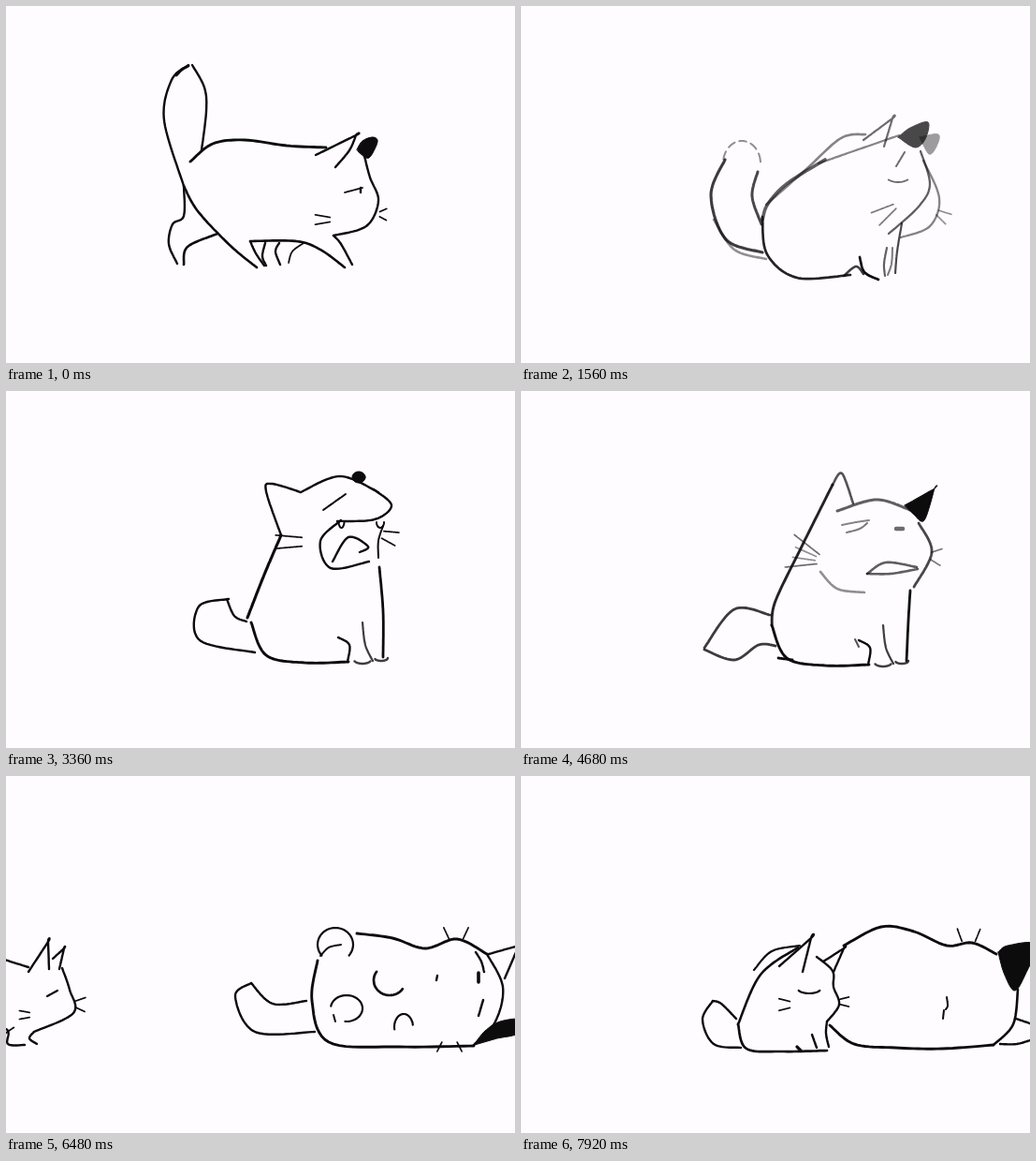
Write an HTML page that moves like this. It is 544 px wide and 381 px high and loops after 8 s.

```html
<!DOCTYPE html>
<html lang="en">
<head>
<meta charset="utf-8">
<title>Two cats</title>
<style>
html, body { margin: 0; width: 100%; height: 100%; overflow: hidden; background: #fefcff; }
svg { display: block; width: 100vw; height: 100vh; fill: none; stroke: #0c0c0c; stroke-linecap: round; stroke-linejoin: round; filter: blur(.45px); }
</style>
</head>
<body>
<svg id="stage" viewBox="0 0 544 381"></svg>
<script>
const LOOP = 8000, STEP = 120, SAMPLES = 40, GROUND = 290;
const lerp = (a, b, k) => a + (b - a) * k;
const polar = (x, y, rx, ry, deg) => [x + rx * Math.cos(deg * Math.PI / 180), y + ry * Math.sin(deg * Math.PI / 180)];
const sample = fn => Array.from({ length: SAMPLES + 1 }, (_, n) => fn(n / SAMPLES));

// Stroke makers: a smooth curve through key points, an arc, and a pair of whiskers.
function line(keys, width = 2.4, ink = 1) {
  const points = keys.split(' ').map(p => p.split(',').map(Number));
  const last = points.length - 1;
  const at = i => points[Math.max(0, Math.min(last, i))];
  const pts = sample(k => {
    const i = Math.min(last - 1, Math.floor(k * last)), t = k * last - i;
    return [0, 1].map(c => {
      const [a, b, d, e] = [-1, 0, 1, 2].map(n => at(i + n)[c]);
      return b + t / 2 * (d - a + t * (2 * a - 5 * b + 4 * d - e + t * (3 * (b - d) + e - a)));
    });
  });
  return { pts, width, ink };
}
function arc(x, y, rx, ry, from, to, width = 2.2, ink = 1) {
  return { pts: sample(k => polar(x, y, rx, ry, lerp(from, to, k))), width, ink };
}
function fan(name, x, y, deg, spread, inner, outer, ink = 1) {
  const ray = a => ({ pts: sample(k => { const r = lerp(inner, outer, k); return polar(x, y, r, r, a); }), width: 1.7, ink });
  return { [name + 'A']: ray(deg - spread), [name + 'B']: ray(deg + spread) };
}

// Pose tools
function warp(pose, fn) {
  const out = {};
  for (const name in pose) out[name] = { ...pose[name], pts: pose[name].pts.map(([x, y]) => fn(x, y)) };
  return out;
}
const lean = (pose, skew, stretch) => warp(pose, (x, y) => [x + skew * (GROUND - y), GROUND + (y - GROUND) * stretch]);
const shift = (pose, dx, dy = 0) => warp(pose, (x, y) => [x + dx, y + dy]);
const shrink = pose => warp(pose, (x, y) => [x * .8 - 246, y * .8 + 66]);
const without = (pose, pattern) => Object.fromEntries(Object.entries(pose).filter(([name]) => !pattern.test(name)));

function mix(a, b, k) {
  if (k <= 0 || a === b) return a;
  if (k >= 1) return b;
  const out = {};
  for (const name in { ...a, ...b }) {
    const s = a[name], e = b[name];
    if (s && e) {
      out[name] = {
        pts: s.pts.map(([x, y], i) => [lerp(x, e.pts[i][0], k), lerp(y, e.pts[i][1], k)]),
        width: lerp(s.width, e.width, k),
        ink: lerp(s.ink, e.ink, k)
      };
    } else if (k < .5 ? s : e) out[name] = s || e;
  }
  return out;
}
function track(keys, t, blend) {
  const i = keys.findIndex(([time]) => time > t);
  if (i <= 0) return keys[i ? keys.length - 1 : 0][1];
  const [t0, a] = keys[i - 1], [t1, b] = keys[i];
  return blend(a, b, (t - t0) / (t1 - t0));
}

// Big cat
const walk = {
  tailL: line('195,63 177,79 169,122 190,192'),
  tailR: line('199,63 212,87 214,112 209,154'),
  tuft: line('182,74 188,68 195,64', 2.8),
  back: line('342,151 300,149 255,143 221,147 197,166', 2.9),
  hip: line('190,192 205,219 240,256 268,279', 2.6),
  haunch: line('190,192 190,224 178,233 174,254 183,275'),
  heel: line('190,276 194,257 226,243', 2.6),
  belly: line('261,251 310,251 336,260 362,279', 2.6),
  leg1: line('261,251 267,264 276,277'),
  leg2: line('277,253 274,267 278,277'),
  leg3: line('292,253 288,262 293,276'),
  leg4: line('318,253 306,262 302,274', 1.8),
  chest: line('350,245 358,254 370,276'),
  ear1: line('331,159 374,138 374,138 367,154 352,172'),
  fillEar: line('375,153 381,144 392,140 397,145 388,162 378,157'),
  face: line('383,160 389,183 398,208 385,235 350,245'),
  eye: line('362,199 381,194', 1.8),
  pupil: line('379,194 379,199'),
  ...fan('cheek', 360, 228, 180, 10, 14, 30),
  ...fan('whisker', 394, 222, 2, 26, 6, 14)
};
const strideLegs = {
  haunch: line('190,192 190,226 183,238 184,256 194,276'),
  heel: line('203,276 205,256 226,243'),
  leg1: line('261,251 264,265 270,277'),
  leg2: line('277,253 281,268 286,277'),
  leg3: line('296,253 298,262 303,276')
};
const stand = { ...walk, ...strideLegs };

const loaf = {
  tailL: line('218,164 203,202 219,249 258,263', 3.1, .8),
  tailR: line('253,177 247,203 257,233', 3, .75),
  ghostTail: line('206,228 228,260 262,270', 2.6, .45),
  back: line('325,164 285,189 264,211 258,228', 3.6, .65),
  ghostBack: line('262,212 305,174 342,141 368,137', 2.6, .5),
  headtop: line('318,168 355,155 404,138', 2.2, .5),
  hip: line('258,225 263,265 295,290 352,287', 2.7, .9),
  ear1: line('366,143 397,120 397,120 388,150', 2.2, .6),
  fillEar: line('403,140 416,130 435,124 432,142 421,151 403,140', 1, .75),
  fillGhost: line('426,140 446,137 444,150 436,158 426,140', 1, .4),
  face: line('427,155 437,190 425,214 393,243', 2.3, .65),
  ghostFace: line('430,165 447,205 437,235 406,247', 2.3, .5),
  brow: arc(403, 177, 16, 11, 130, 50, 1.8, .6),
  lock: line('401,171 410,156', 2, .6),
  ...fan('cheek', 410, 207, 147, 12, 13, 38, .55),
  ...fan('whisker', 436, 215, 31, 14, 11, 25, .45),
  chest: line('407,232 402,262 400,285', 2.2, .75),
  leg1: line('391,258 388,275 389,288', 2.2, .65),
  leg2: line('397,258 396,275 392,287', 2, .55),
  paw: line('362,268 367,284 382,292', 2.7),
  foot: line('345,288 358,278 366,286', 2.5, .8)
};
// The soft dashes at the tip of the curled tail.
for (let i = 0; i < 5; i++) loaf['tuft' + i] = arc(236, 168, 20, 24, 190 + i * 36, 212 + i * 36, 2, .45);

const perk = {
  ...without(lean(loaf, 0, 1.05), /ghost/i),
  face: lean({ face: loaf.ghostFace }, 0, 1.05).face
};

const seat = {
  hip: line('268,250 284,285 325,293 372,292', 2.9),
  leg1: line('387,250 390,274 398,291', 2.2, .8),
  paw: line('361,266 373,274 371,292', 2.4),
  foot: arc(387, 290, 9, 4, 160, 20, 2.4, .8),
  toe: arc(407, 288, 7, 3, 160, 0, 2.4, .8)
};

const yawn = {
  ...shift(seat, -6, -3),
  tailL: line('238,222 206,230 207,266 266,279'),
  tailR: line('236,222 244,240 257,246'),
  back: line('294,154 276,196 258,242', 3.1),
  ear1: line('294,154 278,107 284,99 315,108'),
  headtop: line('315,108 357,91 398,108'),
  fillEar: arc(377, 92, 7, 6, 0, 360),
  face: line('393,105 412,122 394,137 354,139'),
  mouth: line('358,138 336,160 347,189 388,182'),
  tongue: line('349,182 366,156 387,166 378,172'),
  fang1: arc(358.5, 139, 3, 7, 180, 0, 2), fang2: arc(400, 140, 4, 6, 180, 0, 2),
  eye: line('339,127 363,110', 2),
  jaw: line('403,144 398,160 398,178', 2),
  ...fan('cheek', 370, 161, 180, 5, 54, 82),
  ...fan('whisker', 385, 148, 17, 12, 19, 35),
  chest: line('399,188 403,235 403,284', 2.8)
};

const sit = {
  ...seat,
  tailL: line('196,276 228,287 254,271 272,272', 2.8, .8),
  tailR: line('196,274 228,233 266,239', 2.8, .8),
  back: line('333,100 300,166 272,224 268,250', 2.9, .9),
  rump: line('275,285 290,287', 2.8),
  ear1: line('333,100 343,88 355,120', 2.6, .7),
  headtop: line('338,128 380,116 416,127', 3, .65),
  fillEar: line('410,122 442,104 442,104 431,138 420,132'),
  face: line('425,141 439,172 420,209', 2.8, .75),
  eye: line('343,143 358,140 372,138', 2, .5),
  eye2: line('348,151 362,147 370,141', 2, .55),
  nose: line('401,147 408,147', 4.5, .6),
  mouth: line('370,195 390,183 423,188', 2.6, .65),
  lip: line('370,195 395,195 424,190', 2.6, .65),
  chin: line('320,193 338,211 367,215', 2.6, .45),
  ...fan('cheek', 330, 183, 196, 22, 14, 48, .6),
  ...fan('tuft', 330, 183, 196, 8, 16, 40, .45),
  ...fan('whisker', 430, 175, 7, 25, 9, 21, .55),
  chest: line('416,213 414,245 412,288', 2.8),
  claw: line('357,265 361,273', 2, .7)
};

const lie = {
  tailL: line('300,138 274,160 283,214 324,243'),
  tailR: line('302,139 318,152 319,182 330,203'),
  back: line('522,187 500,175 458,176 420,161 380,157 342,180 324,235', 2.8),
  hip: line('324,235 336,269 370,287 440,291 508,285', 2.8),
  face: line('522,187 533,225 527,265 508,285', 2.7),
  ear1: line('510,178 550,162 550,162 528,203'),
  fillEar: line('520,277 537,251 550,252 550,277 530,282'),
  paw1: arc(380, 190, 14, 14, -130, 90), claw1: line('366,190 361,200', 2),
  paw2: arc(431, 194, 13, 11, -75, -285),
  paw3: arc(381, 260, 14, 14, -140, 100), claw3: line('368,261 370,268', 2),
  paw4: arc(427, 270, 11, 14, 180, 360),
  nose: line('469,237 469,240', 4),
  brow: line('502,188 508,198 511,209'), eye: line('508,226 508,236', 3), lid: line('514,256 511,272'),
  ...fan('whisker', 474, 200, 267, 15, 24, 53),
  ...fan('low', 484, 282, 55, 33, 9, 20),
  shade: line('346,286 366,287', 3.8)
};

const curl = {
  ...without(lie, /shade|claw1/),
  tailL: line('262,221 245,235 266,273 330,273'),
  tailR: line('262,221 285,243 321,240'),
  back: line('514,190 482,174 448,184 413,173 375,168', 2.9),
  hip: line('333,197 327,240 345,284 420,289 500,288', 2.9),
  face: line('514,190 531,225 523,262 500,287'),
  ear1: line('516,190 548,181 548,181 533,216'),
  fillEar: line('500,287 512,272 528,262 550,260 550,274 525,280'),
  paw1: arc(352, 180, 19, 18, 140, 400), toe1: line('336,192 345,183 358,180', 2),
  paw2: arc(410, 218, 17, 16, 215, 35, 2.7),
  paw3: arc(364, 248, 17, 14, -170, 95), claw3: line('350,255 352,262', 2),
  paw4: arc(425, 268, 10, 14, 170, 350),
  nose: line('461,213 460,218', 2.4),
  eye: line('505,210 505,220', 3.6), lid: line('510,239 505,256', 2.5),
  ...fan('whisker', 481, 190, 270, 25, 18, 31),
  ...fan('low', 474, 268, 90, 27, 18, 29)
};

const turned = {
  back: line('508,190 482,178 455,181 420,166 385,161 345,181', 2.9),
  hip: line('330,266 356,286 400,290 450,291 505,287', 2.9),
  face: line('531,228 526,265 505,287', 2.6),
  fillEar: line('510,188 520,181 550,180 538,214 527,229 516,210 510,188'),
  foot: line('529,259 550,266'), toe: line('512,286 530,286 550,280'),
  nose: line('455,236 456,245 454,249', 2), lid: line('452,250 451,259', 2),
  ...fan('whisker', 478, 195, 271, 21, 20, 34)
};

const bigKeys = [
  [0, walk], [360, stand], [720, stand], [1080, lean(stand, .06, 1.055)],
  [1560, loaf], [1680, perk], [1800, perk],
  [2280, lean(sit, -.08, .98)], [2640, lean(sit, -.12, 1.06)], [3120, yawn], [3480, yawn],
  [4320, lean(sit, -.05, 1.02)], [4680, sit], [5160, lean(sit, .28, 1.06)],
  [5520, lie], [6480, curl], [6840, curl], [7800, turned]
];

// Small cat
const kitWalk = {
  ...without(shrink(walk), /fill|pupil/),
  back: line('24,204 -15,192 -50,182 -88,199'),
  ear1: line('24,209 45,177 45,177 46,206'),
  ear2: line('50,195 62,184 62,184 57,206'),
  face: line('60,205 68,228 72,253 30,273'),
  eye: line('44,235 55,229', 2.2),
  ...fan('cheek', 40, 255, 180, 10, 15, 26),
  ...fan('whisker', 66, 243, 3, 22, 9, 20),
  belly: line('-37,267 0,270 2,286 20,287'),
  chest: line('30,273 25,280 33,286')
};
const kitStep = { ...kitWalk, ...shrink(strideLegs) };

const kitSit = {
  tailL: line('205,240 194,260 206,286 235,290'),
  tailR: line('205,240 214,243 230,259'),
  back: line('296,183 256,212 232,265', 2.6),
  nape: line('249,207 268,187 298,181', 2.2),
  hip: line('232,265 241,291 280,294 327,293', 2.7),
  ear1: line('276,203 310,173 310,173 301,209'),
  ear2: line('323,198 345,184 345,184 334,209'),
  face: line('316,193 333,208 334,225 340,244 327,262'),
  eye: arc(308, 226, 13, 6, 150, 30),
  ...fan('cheek', 301, 244, 180, 14, 14, 26),
  ...fan('whisker', 330, 241, 0, 14, 11, 21),
  chest: line('327,262 326,275 329,289'),
  leg1: line('311,276 316,290'), leg2: line('295,289 299,293', 3.2)
};

const ENTER = 5160, SIT_START = 7440, SIT_END = 7800;
const kitPath = [[ENTER, -110], [5520, -60], [6480, 0], [SIT_START, 258], [SIT_END, 266]];

function kitten(t) {
  if (t < ENTER) return {};
  const stride = .5 - .5 * Math.cos((t - 6480) / 480 * 2 * Math.PI);
  const walking = shift(mix(kitWalk, kitStep, stride), track(kitPath, t, lerp));
  return mix(walking, kitSit, (t - SIT_START) / (SIT_END - SIT_START));
}

function draw(cat) {
  return Object.entries(cat).map(([name, { pts, width, ink }]) => {
    const d = 'M' + pts.map(p => p.map(v => v.toFixed(1)).join(' ')).join('L');
    const solid = name.startsWith('fill');
    return `<path d="${d}${solid ? 'Z' : ''}" stroke-width="${solid ? 1 : width}" opacity="${ink}"${solid ? ' fill="#0c0c0c"' : ''}/>`;
  }).join('');
}

const stage = document.getElementById('stage');
const start = performance.now();
let shown = -1;
function frame(now) {
  const t = Math.floor(Math.max(0, now - start) % LOOP / STEP) * STEP;
  if (t !== shown) {
    shown = t;
    stage.innerHTML = draw(track(bigKeys, t, mix)) + draw(kitten(t));
  }
  requestAnimationFrame(frame);
}
frame(start);
</script>
</body>
</html>
```
